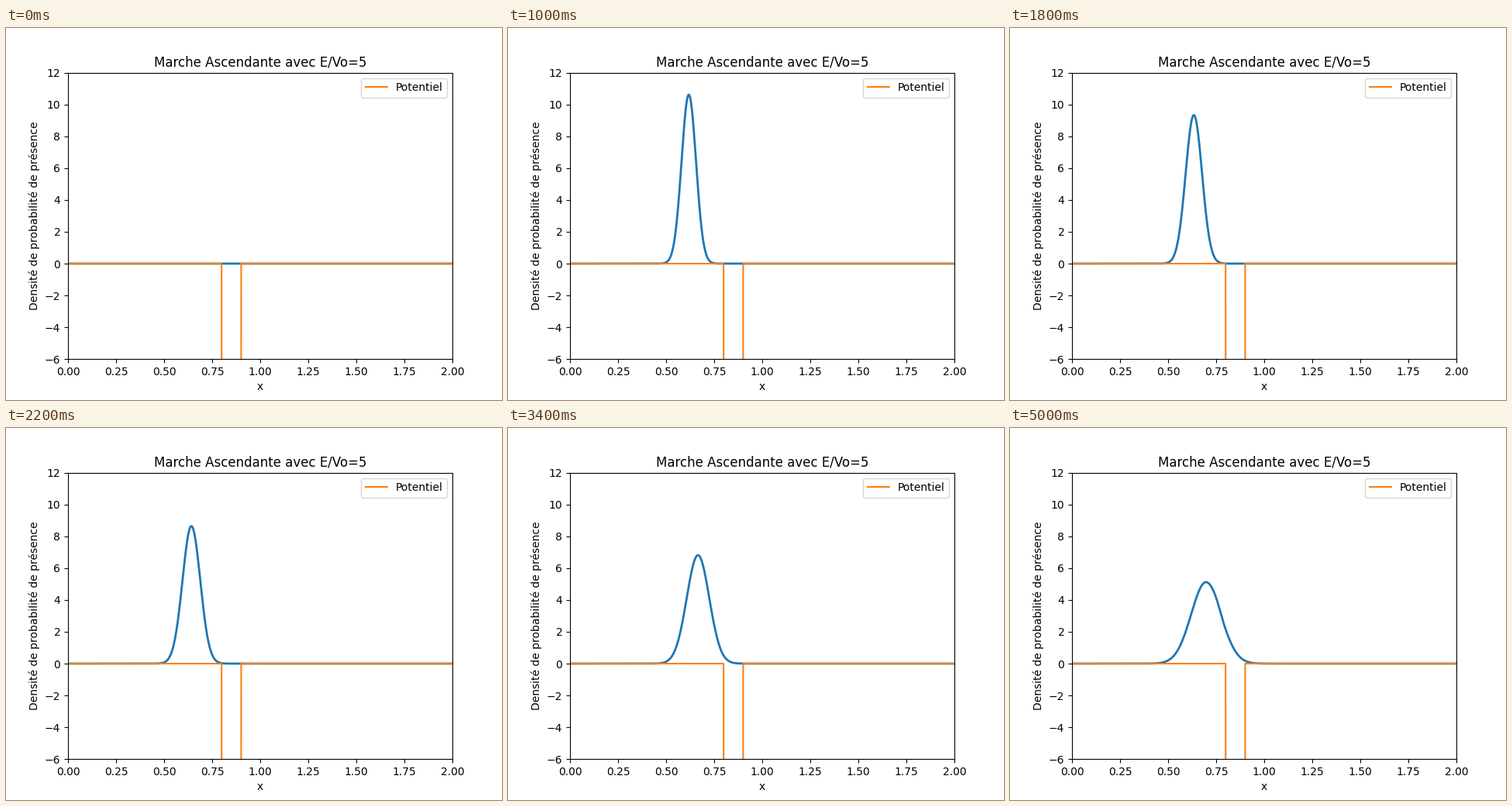
Animation, 640 px wide and 480 px high, one loop 5.1 s. Source, as a matplotlib script:

```python
import matplotlib.pyplot as plt
import numpy as np
from matplotlib.animation import FuncAnimation

FRAMES = 51
STEPS_PER_FRAME = 1000
DT, DX, NX = 1e-7, 1e-3, 2000
CENTRE, SIGMA = 0.6, 0.05
DEPTH, RATIO = -40, 5

x = np.linspace(0, (NX - 1) * DX, NX)
potential = np.zeros(NX)
potential[(x >= 0.8) & (x <= 0.9)] = DEPTH


def simulate():
    """Leapfrog the Schrödinger equation; the first density is empty."""
    k = np.sqrt(2 * abs(RATIO * DEPTH))
    amplitude = 1 / np.sqrt(SIGMA * np.sqrt(np.pi))
    psi = amplitude * np.exp(1j * k * x - (x - CENTRE) ** 2 / (2 * SIGMA ** 2))
    re, im = psi.real.copy(), psi.imag.copy()
    s = DT / DX ** 2
    diag = 2 * (s + potential[1:-1] * DT)

    def kick(f):
        return s * (f[2:] + f[:-2]) - diag * f[1:-1]

    densities = np.zeros((FRAMES, NX))
    for n in range(1, FRAMES):
        previous = im.copy()
        im[1:-1] += kick(re)
        densities[n, 1:-1] = (re ** 2 + im * previous)[1:-1]
        if n == FRAMES - 1:
            break
        for _ in range(STEPS_PER_FRAME // 2 - 1):
            re[1:-1] -= kick(im)
            im[1:-1] += kick(re)
        re[1:-1] -= kick(im)
    return densities


densities = simulate()

fig, ax = plt.subplots(figsize=(6.4, 4.8), dpi=100)
wave, = ax.plot([], [], lw=2)
ax.plot(x, potential, label="Potentiel")
ax.set_xlim(0, 2)
ax.set_ylim(-6, 12)
ax.set_title(f"Marche Ascendante avec E/Vo={RATIO}")
ax.set_xlabel("x")
ax.set_ylabel("Densité de probabilité de présence")
ax.legend(loc="upper right")


def update(n):
    wave.set_data(x, densities[n])
    return wave,


anim = FuncAnimation(fig, update, frames=FRAMES, interval=100,
                     repeat=True, repeat_delay=0, blit=False)
plt.show()
```
